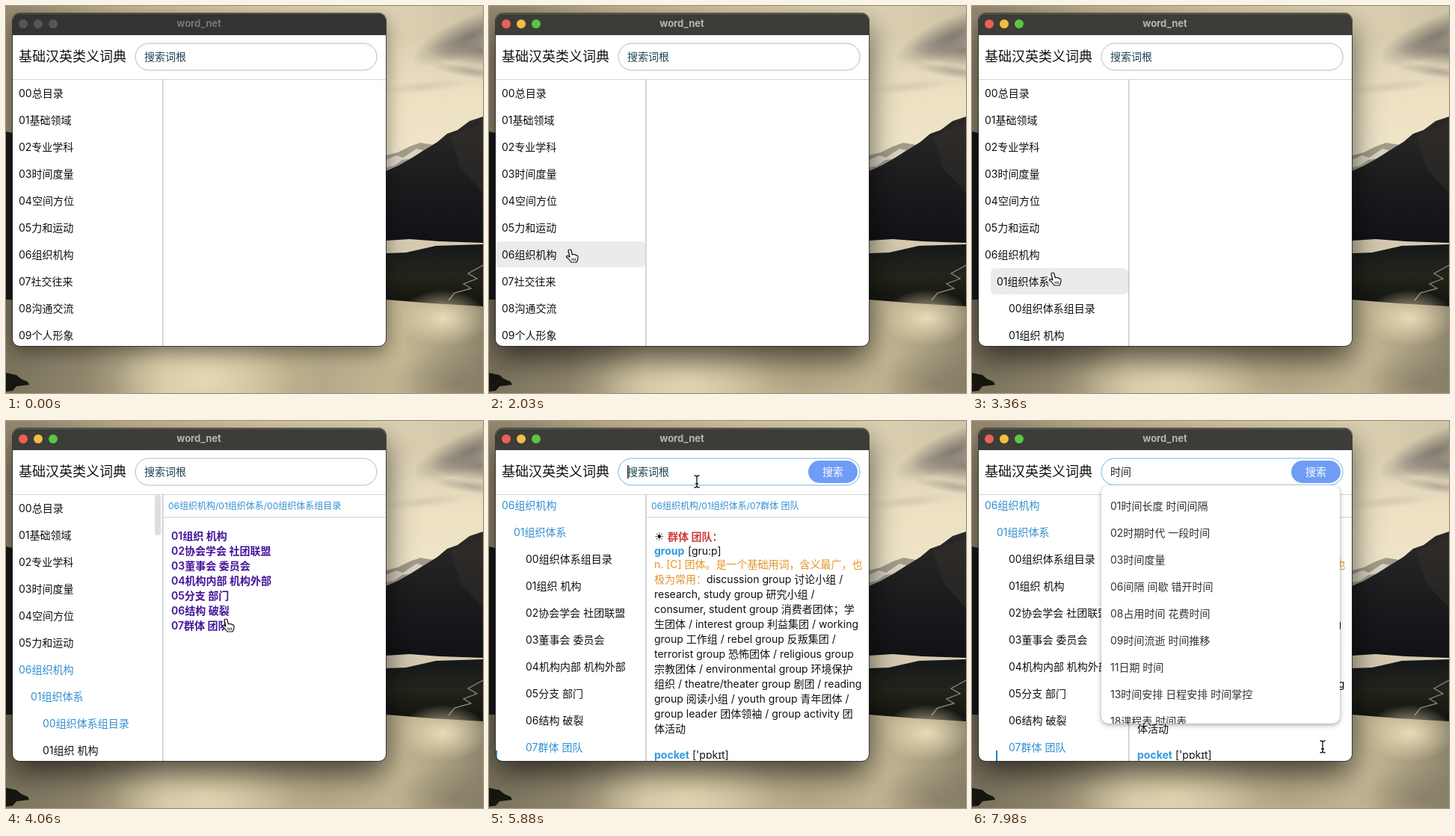
Write an HTML page with a canvas that moves like this. It is 638 px wide and 518 px high and loops after 8000 ms.

```html
<!DOCTYPE html>
<html lang="zh-CN">
<head>
<meta charset="utf-8">
<style>
html, body { margin: 0; width: 100%; height: 100%; overflow: hidden; }
canvas { display: block; width: 638px; height: 518px; }
</style>
</head>
<body>
<canvas id="stage"></canvas>
<script>
const LOOP = 8000, STEP = 70, ROW = 36;
const FONT = 'Inter, "Noto Sans CJK SC", "Noto Sans CJK", sans-serif';
const canvas = document.getElementById('stage');
const ratio = window.devicePixelRatio || 1;
canvas.width = 638 * ratio;
canvas.height = 518 * ratio;
const c = canvas.getContext('2d');
c.scale(ratio, ratio);

const topics = ['00总目录', '01基础领域', '02专业学科', '03时间度量', '04空间方位', '05力和运动',
  '06组织机构', '07社交往来', '08沟通交流', '09个人形象'];
const groups = ['00组织体系组目录', '01组织 机构', '02协会学会 社团联盟', '03董事会 委员会',
  '04机构内部 机构外部', '05分支 部门', '06结构 破裂', '07群体 团队'];
const hits = ['01时间长度 时间间隔', '02时期时代 一段时间', '03时间度量', '06间隔 间歇 错开时间',
  '08占用时间 花费时间', '09时间流逝 时间推移', '11日期 时间', '13时间安排 日程安排 时间掌控', '18课程表 时间表'];
const usage = ['research, study group 研究小组 /', 'consumer, student group 消费者团体；学',
  '生团体 / interest group 利益集团 / working', 'group 工作组 / rebel group 反叛集团 /',
  'terrorist group 恐怖团体 / religious group', '宗教团体 / environmental group 环境保护',
  '组织 / theatre/theater group 剧团 / reading', 'group 阅读小组 / youth group 青年团体 /',
  'group leader 团体领袖 / group activity 团', '体活动'];

// Pointer path: time, x, y of the hot spot
const path = [[70, 230, 495], [490, 80, 300], [770, 80, 300], [1050, 86, 315], [1400, 86, 315],
  [1610, 86, 327], [1960, 86, 327], [2030, 108, 327], [2450, 108, 327], [2590, 108, 358],
  [3360, 108, 358], [3500, 115, 396], [3640, 115, 396], [4060, 294, 266], [4130, 292, 266],
  [4340, 290, 270], [4550, 290, 268], [5600, 290, 268], [5880, 278, 81], [7420, 278, 81], [7910, 469, 436]];

const ramp = (t, from, to) => Math.min(1, Math.max(0, (t - from) / (to - from)));

function text(s, x, y, color = '#111', size = 14, weight = 400) {
  c.font = `${weight} ${size}px ${FONT}`;
  c.fillStyle = color;
  c.fillText(s, x, y + size * .36);
  return x + c.measureText(s).width;
}

function box(x, y, w, h, r, fill, stroke) {
  c.beginPath();
  c.roundRect(x, y, w, h, r);
  if (fill) { c.fillStyle = fill; c.fill(); }
  if (stroke) { c.strokeStyle = stroke; c.lineWidth = 1; c.stroke(); }
}

function rect(x, y, w, h, fill) {
  c.fillStyle = fill;
  c.fillRect(x, y, w, h);
}

function clipped(x, y, w, h, r, draw) {
  c.save();
  c.beginPath();
  c.roundRect(x, y, w, h, r);
  c.clip();
  draw();
  c.restore();
}

function gradient(x0, y0, x1, y1, colors) {
  const g = c.createLinearGradient(x0, y0, x1, y1);
  colors.forEach((color, i) => g.addColorStop(i / (colors.length - 1), color));
  return g;
}

function glow(x, y, rx, ry, rgb, alpha, turn = 0) {
  c.save();
  c.translate(x, y);
  c.rotate(turn);
  c.scale(rx, ry);
  const g = c.createRadialGradient(0, 0, 0, 0, 0, 1);
  g.addColorStop(0, `rgba(${rgb},${alpha})`);
  g.addColorStop(1, `rgba(${rgb},0)`);
  rect(-1, -1, 2, 2, g);
  c.restore();
}

function shape(d, fill, stroke, width = 1) {
  const p = new Path2D(d);
  if (fill) { c.fillStyle = fill; c.fill(p); }
  if (stroke) { c.strokeStyle = stroke; c.lineWidth = width; c.stroke(p); }
}

function landscape() {
  rect(0, 0, 638, 230, gradient(0, 0, 638, 0, ['#958a6f', '#c3b594', '#d8caa7', '#e2d6b7', '#cfc3a6']));
  rect(508, 40, 130, 180, gradient(0, 40, 0, 190, ['rgba(236,226,200,0)', '#ece0c2', '#efe4c8']));
  glow(622, 40, 85, 26, '118,113,105', .9, -.4);
  glow(636, 60, 70, 22, '125,120,111', .85, .05);
  glow(625, 88, 60, 9, '150,143,130', .6, .15);
  glow(560, 108, 60, 9, '188,178,156', .45, -.1);
  shape('M0 168L9 170V400H0Z', '#17191b');
  shape('M508 200L524 196 540 188 554 183 572 186 560 230H508Z', '#a39b8a');
  shape('M508 206l14-6 9 3 18-12 9 2-14 11-14 2-11 8-11 2z', '#d9d3c4');
  shape('M508 221L524 214 540 205 556 195 577 182 590 171 604 166 620 154 638 148V402H508Z',
    gradient(0, 150, 0, 315, ['#2b2928', '#1c1c1e', '#101216']));
  shape('M594 174L638 157V250L608 218Z', 'rgba(53,48,44,.5)');
  shape('M508 314L540 312 580 315 638 317V322L575 322 535 331H508Z', '#d5cab0');
  shape('M508 331L535 330 575 321 638 319V402L508 394Z', gradient(0, 320, 0, 400, ['#15181a', '#23251a', '#11130f']));
  shape('M638 347L618 358 630 365 612 372 622 378 600 384 592 394', null, '#8b877c', 1.3);
  shape('M0 393H508L570 398 638 402V518H0Z', gradient(0, 0, 638, 0,
    ['#79725c', '#8f866c', '#cbbf9c', '#c4b894', '#b5a988', '#c4b794', '#8d846c']));
  glow(265, 500, 120, 70, '236,222,185', .85);
  glow(585, 418, 60, 38, '240,226,188', .9);
  glow(600, 505, 90, 45, '118,111,90', .5);
  shape('M0 491L14 494 20 499 29 503 31 507 14 509 9 515 0 516Z', '#15160f');
}

function row(level, label, y, blue, hover) {
  const x = 9 + level * 16;
  if (hover) box(x, y - 18, 209 - x, 35, 6, '#ebebeb');
  text(label, x + 8, y, blue ? '#318fcf' : '#111');
}

// Slides child rows out from beneath their parent; returns the space taken.
function unfold(y, count, p, draw) {
  const full = count * ROW;
  if (p > 0) clipped(9, y - 18, 200, full * p, 0, () => draw(y - full * (1 - p)));
  return full * p;
}

function sidebar(t) {
  const picked = t < 3570 ? -1 : t < 4830 ? 0 : 7;
  const forces = t < 1400 ? ramp(t, 770, 980) : 1 - ramp(t, 1400, 1610);
  const bodies = ramp(t, 2240, 2450), system = ramp(t, 2730, 2891);
  const hover = t < 770 ? '' : t < 1610 ? '05' : t < 2590 ? '06' : t < 3430 ? 'system' : t < 3780 ? 'index' : '';
  let y = 117 - 220 * ramp(t, 4830, 5110);
  for (const label of topics) {
    const id = label.slice(0, 2);
    row(0, label, y, id === '06' && picked >= 0, hover === id);
    y += ROW;
    if (id === '05') y += unfold(y, 2, forces, top => {
      row(1, '01机械力', top);
      row(1, '02机械运动', top + ROW);
    });
    if (id === '06') y += unfold(y, 2 + 8 * system, bodies, top => {
      row(1, '01组织体系', top, picked >= 0, hover === 'system');
      const used = unfold(top + ROW, 8, system, inner => groups.forEach((g, i) =>
        row(2, g, inner + i * ROW, i === picked, hover === 'index' && !i)));
      row(1, '02组织管理', top + ROW + used);
    });
  }
  if (t >= 3640 && t < 4480) box(199, 99, 8, 54, 4, '#dedede');
}

function article(t) {
  if (t < 3570) return;
  const entry = t >= 4830;
  text('06组织机构/01组织体系/' + groups[entry ? 7 : 0], 217, 113.5, '#318fcf', 12);
  rect(211, 128, 297, 2, '#e6e6e6');
  if (!entry) {
    groups.slice(1).forEach((g, i) => text(g, 221, 154 + 20 * i, '#43139a', 14, 600));
    return;
  }
  c.font = '15px "DejaVu Sans", sans-serif';
  c.fillStyle = '#111';
  c.fillText('☀', 221, 160);
  text('群体 团队：', 239, 155, '#cd3a3a', 14, 600);
  text('group', 221, 174, '#329bdd', 14, 700);
  text('[gru:p]', 266, 174);
  text('n. [C] 团体。是一个基础用词，含义最广，也', 221, 192, '#e3962a');
  text('极为常用：', 221, 212, '#e3962a');
  text('discussion group 讨论小组 /', 291, 212);
  usage.forEach((s, i) => text(s, 221, 232 + 20 * i));
  text('pocket', 221, 447, '#329bdd', 14, 700);
  text("['pɒkɪt]", 272, 447);
}

function search(t) {
  const focus = t >= 5740;
  box(173, 50, 323, 36, 18, '#fff', focus ? '#75b5de' : '#b9b9b9');
  const pinyin = 'shi jian'.slice(0, 1 + Math.floor((t - 6300) / 84));
  const typed = t < 6300 ? '' : t < 7000 ? pinyin : '时间';
  const end = text(typed || '搜索词根', 185, 68, typed ? '#222' : '#1d4051');
  if (typed && t < 7000) rect(185, 76, end - 185, 1, '#222');
  const caretOn = t < 6160 || (t >= 6300 && t < 7490);
  if (focus && caretOn) rect(typed ? end + 1 : 185, 59, 1.5, 18, '#333');
  if (focus) {
    box(427, 53, 66, 30, 15, '#6f9df5');
    text('搜索', 446, 68, '#fff', 14, 500);
  }
}

function results(t) {
  if (t < 6440) return;
  c.save();
  c.shadowColor = 'rgba(0,0,0,.35)';
  c.shadowBlur = 6 * ratio;
  c.shadowOffsetY = 2 * ratio;
  box(173, 86, 319, 319, 10, '#fff');
  c.restore();
  if (t >= 7000) clipped(173, 86, 319, 319, 10, () =>
    hits.forEach((h, i) => text(h, 185, 114 + ROW * i, '#333')));
}

function appWindow(t) {
  const active = t >= 770;
  c.save();
  c.shadowColor = `rgba(0,0,0,${active ? .65 : .45})`;
  c.shadowBlur = (active ? 42 : 26) * ratio;
  c.shadowOffsetY = (active ? 16 : 8) * ratio;
  box(9, 10, 499, 445, 9, '#fff');
  c.restore();
  clipped(9, 10, 499, 445, 9, () => {
    rect(9, 10, 499, 445, '#fff');
    rect(9, 10, 499, 29, active ? '#3d3c38' : '#333');
    rect(9, 10, 499, 1, active ? '#62615c' : '#515151');
    ['#ed5f57', '#f5be42', '#58c840'].forEach((color, i) =>
      box(17 + 20 * i, 18, 12, 12, 6, active ? color : '#555'));
    c.textAlign = 'center';
    text('word_net', 258, 23.5, active ? '#b8b6b1' : '#777', 13, 700);
    c.textAlign = 'left';
    text('基础汉英类义词典', 17, 68, '#111', 18);
    clipped(9, 99, 200, 356, 0, () => sidebar(t));
    rect(209, 98, 1.5, 357, '#c8c8c8');
    article(t);
    rect(9, 98, 499, 1, '#d4d4d4');
    search(t);
    if (t >= 5740) rect(t < 6300 ? 9 : 32, 441, 2, 14, '#2a7fc4');
    results(t);
  });
  box(8.5, 9.5, 500, 446, 9.5, null, 'rgba(35,35,35,.75)');
}

function pointer(t) {
  if (t < 70 || (t >= 6300 && t < 7420)) return;
  let i = path.findIndex(k => k[0] > t);
  if (i < 0) i = path.length;
  const a = path[i - 1], b = path[i] || a;
  const p = a === b ? 0 : ramp(t, a[0], b[0]), e = p * p * (3 - 2 * p);
  c.save();
  c.translate(a[1] + (b[1] - a[1]) * e, a[2] + (b[2] - a[2]) * e);
  c.lineJoin = 'round';
  if (t < 770) {
    shape('M0 0V16L4 12 7 19 10 18 7 11H12Z', '#111', '#fff');
  } else if (t < 5670) {
    shape('M-2 1Q-2-1 0-1T2 1L3.5 6Q5 4.5 6 6Q8 5 8.5 7Q11 6.5 11 9L10.5 13 9 16H2L-2 11-4.5 9Q-4.5 7-2.5 7.5L0 9Z', '#fff', '#111', 1.2);
    shape('M3 10.5V14M5.2 10.5V14M7.4 10.5V14', null, '#111', .9);
  } else {
    const beam = 'M-3.5-8Q0-8 0-6Q0-8 3.5-8M0-6V6M-3.5 8Q0 8 0 6Q0 8 3.5 8M-2 3H2';
    shape(beam, null, '#fff', 3);
    shape(beam, null, '#111', 1.3);
  }
  c.restore();
}

function frame(now) {
  const t = Math.floor(now % LOOP / STEP) * STEP;
  landscape();
  appWindow(t);
  pointer(t);
  requestAnimationFrame(frame);
}
requestAnimationFrame(frame);
</script>
</body>
</html>
```
